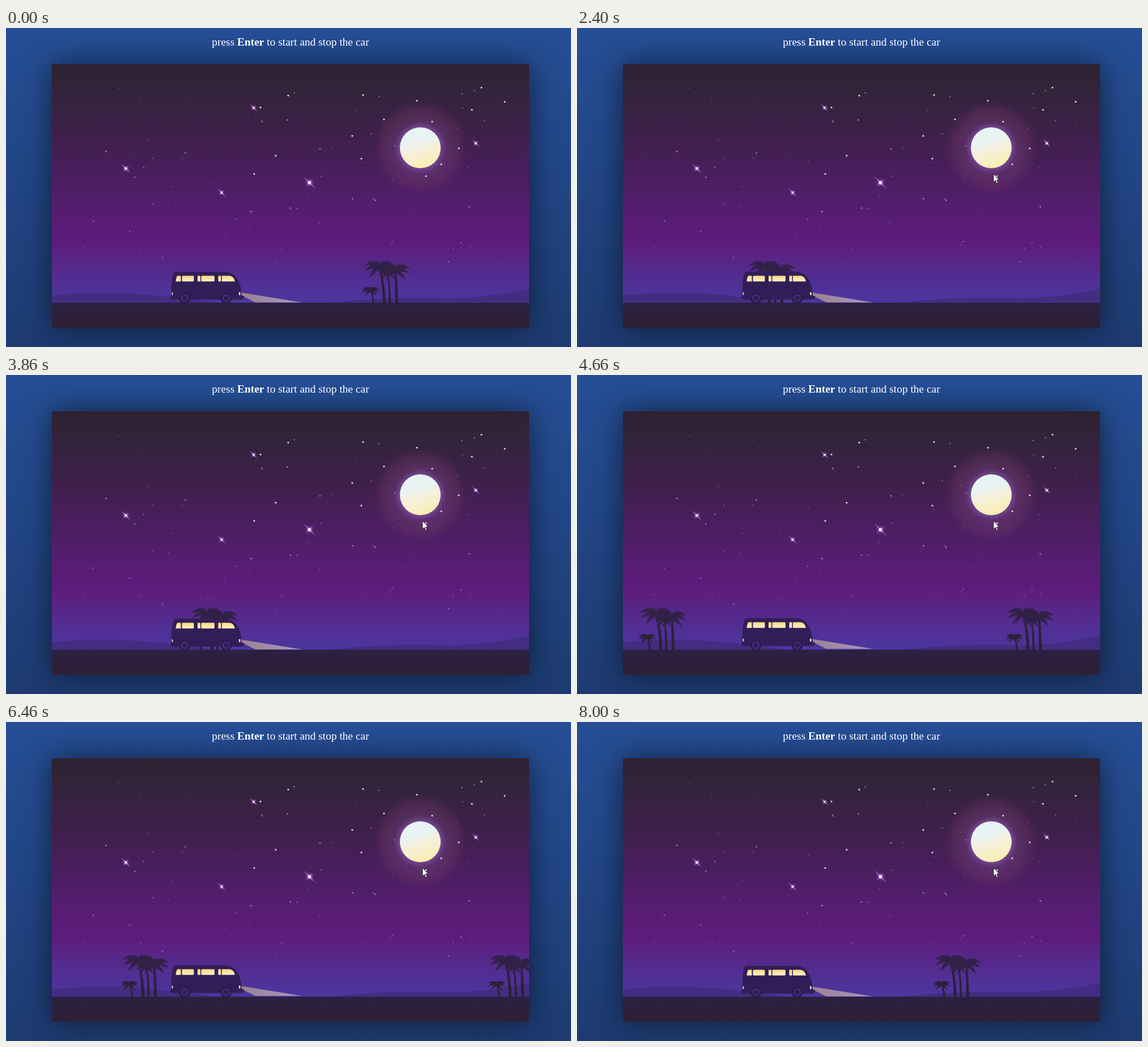
These frames come from a looping animation (997x562 px, 8.2 s). An HTML page:

```html
<!DOCTYPE html>
<html lang="en">
<head>
<meta charset="utf-8">
<title>Night drive</title>
<style>
  html, body { margin: 0; width: 100%; height: 100%; overflow: hidden; }
  body { background: linear-gradient(#264e96, #1d3b71); }
  svg { display: block; width: 100%; height: 100%; }
  text { font: 19.4px "Liberation Serif", "Times New Roman", serif; fill: #fff; }
  .bold { font-weight: bold; }
</style>
</head>
<body>
<svg viewBox="0 0 997 562">
  <defs>
    <linearGradient id="sky" x2="0" y2="1">
      <stop offset="0" stop-color="#2e2131"/>
      <stop offset=".1" stop-color="#32243a"/>
      <stop offset=".28" stop-color="#3d2049"/>
      <stop offset=".62" stop-color="#561d71"/>
      <stop offset=".75" stop-color="#5e1c7c"/>
      <stop offset=".83" stop-color="#572788"/>
      <stop offset="1" stop-color="#4b37a1"/>
    </linearGradient>
    <linearGradient id="ground" x2="0" y2="1">
      <stop offset="0" stop-color="#2c2043"/>
      <stop offset="1" stop-color="#2e2033"/>
    </linearGradient>
    <linearGradient id="moon" x1=".35" x2=".65" y2="1">
      <stop offset=".3" stop-color="#e7f4f3"/>
      <stop offset=".55" stop-color="#f6f0dc"/>
      <stop offset="1" stop-color="#f9eeae"/>
    </linearGradient>
    <radialGradient id="halo">
      <stop offset=".42" stop-color="#8a5bb0" stop-opacity=".7"/>
      <stop offset=".55" stop-color="#744080" stop-opacity=".45"/>
      <stop offset=".8" stop-color="#743a64" stop-opacity=".32"/>
      <stop offset="1" stop-color="#6a2a68" stop-opacity="0"/>
    </radialGradient>
    <radialGradient id="glow">
      <stop offset="0" stop-color="#c86cf0" stop-opacity=".8"/>
      <stop offset="1" stop-color="#a040d0" stop-opacity="0"/>
    </radialGradient>
    <linearGradient id="palm" gradientUnits="userSpaceOnUse" x1="0" x2="0" y1="0" y2="76">
      <stop offset="0" stop-color="#33224d"/>
      <stop offset=".6" stop-color="#2c2038"/>
      <stop offset="1" stop-color="#2b202f"/>
    </linearGradient>
    <linearGradient id="window" x2="0" y2="1">
      <stop offset="0" stop-color="#fcd77e"/>
      <stop offset="1" stop-color="#fff1c8"/>
    </linearGradient>
    <linearGradient id="beam">
      <stop offset="0" stop-color="#9c8190"/>
      <stop offset="1" stop-color="#a79abf"/>
    </linearGradient>
    <filter id="blur" x="-20%" y="-30%" width="140%" height="160%">
      <feGaussianBlur stdDeviation="26"/>
    </filter>
    <clipPath id="frame"><rect x="81" y="64" width="842" height="463.5"/></clipPath>
    <g id="palms" fill="url(#palm)"></g>
  </defs>

  <rect x="81" y="64" width="842" height="463.5" opacity=".55" filter="url(#blur)"/>
  <text x="502" y="31" text-anchor="middle">press <tspan class="bold">Enter</tspan> to start and stop the car</text>

  <g clip-path="url(#frame)">
    <rect x="81" y="64" width="842" height="421" fill="url(#sky)"/>
    <circle cx="731" cy="211" r="84" fill="url(#halo)"/>
    <circle cx="731" cy="211" r="36" fill="url(#moon)"/>
    <g id="stars"></g>
    <g fill="#432d82">
      <path d="M81 471Q180 460 290 474Q330 479 380 485H81Z"/>
      <path d="M560 485Q690 471 775 476Q850 476 923 459V485Z"/>
    </g>
    <g id="trees">
      <use href="#palms" x="628" y="408"/>
      <use href="#palms" x="1276" y="408"/>
    </g>
    <rect x="81" y="484" width="842" height="44" fill="url(#ground)"/>

    <g id="van">
      <path d="M414 466L522 483.6H440L417 472Z" fill="url(#beam)"/>
      <path d="M299 429.5H386Q400 430 406 439Q414 450 415 462L416 472H420V476L417 478.5H294L290 476V473H291.5L292 455Q293 437 296 431Z" fill="#311e57"/>
      <g fill="url(#window)">
        <path d="M302.5 436.5H308.5V446.5H299.5Q300.5 438 302.5 436.5Z"/>
        <rect x="310.5" y="436.5" width="21" height="10" rx="1.5"/>
        <rect x="338" y="436.5" width="5" height="10" rx="1"/>
        <rect x="344.5" y="436.5" width="23.5" height="10" rx="1.5"/>
        <rect x="374.5" y="436.5" width="5" height="10" rx="1"/>
        <path d="M381 436.5H394Q402 437 404 446.5H381Z"/>
      </g>
      <ellipse cx="293.5" cy="468" rx="1" ry="2.7" fill="#f6dfc4"/>
      <ellipse cx="412.3" cy="468" rx="1.4" ry="3" fill="#fff0c4"/>
    </g>
    <g id="wheels" fill="#2b1c4c"></g>
  </g>
  <path id="cursor" d="M0 0V14.5L3.3 11.5L5.5 16.8L7.8 15.8L5.6 10.7H10Z" fill="#fff" stroke="#222" stroke-width=".9"/>
</svg>

<script>
const $ = id => document.getElementById(id);
const repeat = (n, make) => Array.from({ length: n }, (_, i) => make(i)).join("");

let seed = 7;
function random() {
  seed = (seed * 16807) % 2147483647;
  return seed / 2147483647;
}

// Stars: a few landmarks, the rest scattered
const dot = (x, y, r, alpha) =>
  `<circle cx="${x}" cy="${y}" r="${r}" opacity="${alpha}" fill="${y > 335 ? "#a5a8ff" : "#fff"}"/>`;

const landmark = ([x, y]) => dot(x, y, 1.6, .85);

function scattered() {
  const size = random();
  return dot(135 + 750 * random(), 104 + 310 * random(), .8 + .5 * size, .25 + .3 * size);
}

const sparkle = ([x, y, s]) => `<g transform="translate(${x} ${y}) rotate(45)">
  <circle r="${s * .75}" fill="url(#glow)"/>
  <path d="M${-s * 1.4} 0L0 -.8L${s * 1.4} 0L0 .8Z" fill="#dca4f4"/>
  <path d="M0 ${-s * .8}L.8 0L0 ${s * .8}L-.8 0Z" fill="#c987ea"/>
  <circle r="${s * .24}" fill="#fff"/></g>`;

const landmarks = [
  [498, 119], [630, 118], [839, 105], [880, 130], [822, 144], [725, 128], [667, 161], [752, 165],
  [799, 212], [768, 240], [741, 261], [627, 230], [611, 190], [476, 225], [449, 140], [438, 257],
];
const sparkles = [[211.5, 247.5, 9], [380.5, 290, 7.5], [535.5, 272.5, 11.5], [437, 140.5, 7], [829, 203, 7]];

$("stars").innerHTML = repeat(75, scattered) + landmarks.map(landmark).join("") + sparkles.map(sparkle).join("");

// An arched, ragged leaf reaching (dx, dy) from the crown
function frond(cx, cy, dx, dy, lift, width) {
  const steps = 12, length = Math.hypot(dx, dy), side = dx < 0 ? -1 : 1;
  const edge = (i, depth) => {
    const u = i / steps, w = depth * width * Math.sin(Math.PI * (.2 + .8 * u));
    const x = cx + dx * u - side * dy / length * w;
    const y = cy + dy * u - lift * 4 * u * (1 - u) + side * dx / length * w;
    return `${x.toFixed(1)} ${y.toFixed(1)}L`;
  };
  const upper = repeat(steps, i => edge(i, -.25));
  const lower = repeat(steps + 1, i => edge(steps - i, i % 2 ? 1 : .45));
  return `<path d="M${(upper + lower).slice(0, -1)}Z"/>`;
}

// Fronds fan from lower left over the top to lower right
function palm(cx, cy, base, size) {
  const count = 10, top = cy - 1, middle = (top + 76) / 2, w = .7 + size * .065;
  const trunk = `<path d="M${base - w} 76Q${base - w} ${middle} ${cx - w * .7} ${top}H${cx + w * .7}Q${base + w * .7} ${middle} ${base + w} 76Z"/>`;
  return trunk + repeat(count, i => {
    const angle = Math.PI * (1.28 - 1.56 * i / (count - 1));
    const rise = Math.sin(angle), reach = Math.cos(angle);
    const dy = -size * rise * (rise > 0 ? .36 : .85);
    return frond(cx, cy, size * reach, dy, size * (.06 + .14 * Math.abs(reach)), size * .24);
  });
}

$("palms").innerHTML = palm(31, 13, 39.5, 29) + palm(46, 23, 49.5, 19) + palm(59, 18, 61.5, 27) + palm(15.5, 54, 20, 16);

$("wheels").innerHTML = [315.5, 388.5].map(x => `<circle cx="${x}" cy="476" r="10"/>
  <circle cx="${x}" cy="476" r="5.6" fill="#2f1e55" stroke="#4b3189" stroke-width="1.8"/>`).join("");

// Motion
const LOOP = 8200;
const drives = [{ from: 1857, until: 5000 }, { from: 5697, until: 7860 }];

const scroll = $("trees").animate(
  [{ transform: "translateX(0)" }, { transform: "translateX(-525px)" }],
  { duration: 1500, easing: "ease", iterations: Infinity });
scroll.pause();

function draw(now) {
  const elapsed = Math.max(0, now - start) % LOOP;
  const t = Math.floor(Math.floor(elapsed * .015 + .1) * 20 / 3) * 10; // 15 pictures a second

  const drive = drives.find(({ from, until }) => t >= from && t < until);
  scroll.currentTime = drive ? t - drive.from : 0;

  const raised = t > 500 && (t + 366) % 933 < 433;
  $("van").setAttribute("transform", `translate(0 ${raised ? -1 : 0})`);

  const away = Math.max(0, 1 - (t - 460) / 240);
  $("cursor").setAttribute("visibility", t < 460 ? "hidden" : "visible");
  $("cursor").setAttribute("transform", `translate(${735 + 37 * away} ${257 - 245 * away})`);
  requestAnimationFrame(draw);
}
const start = performance.now();
draw(start);
</script>
</body>
</html>
```
